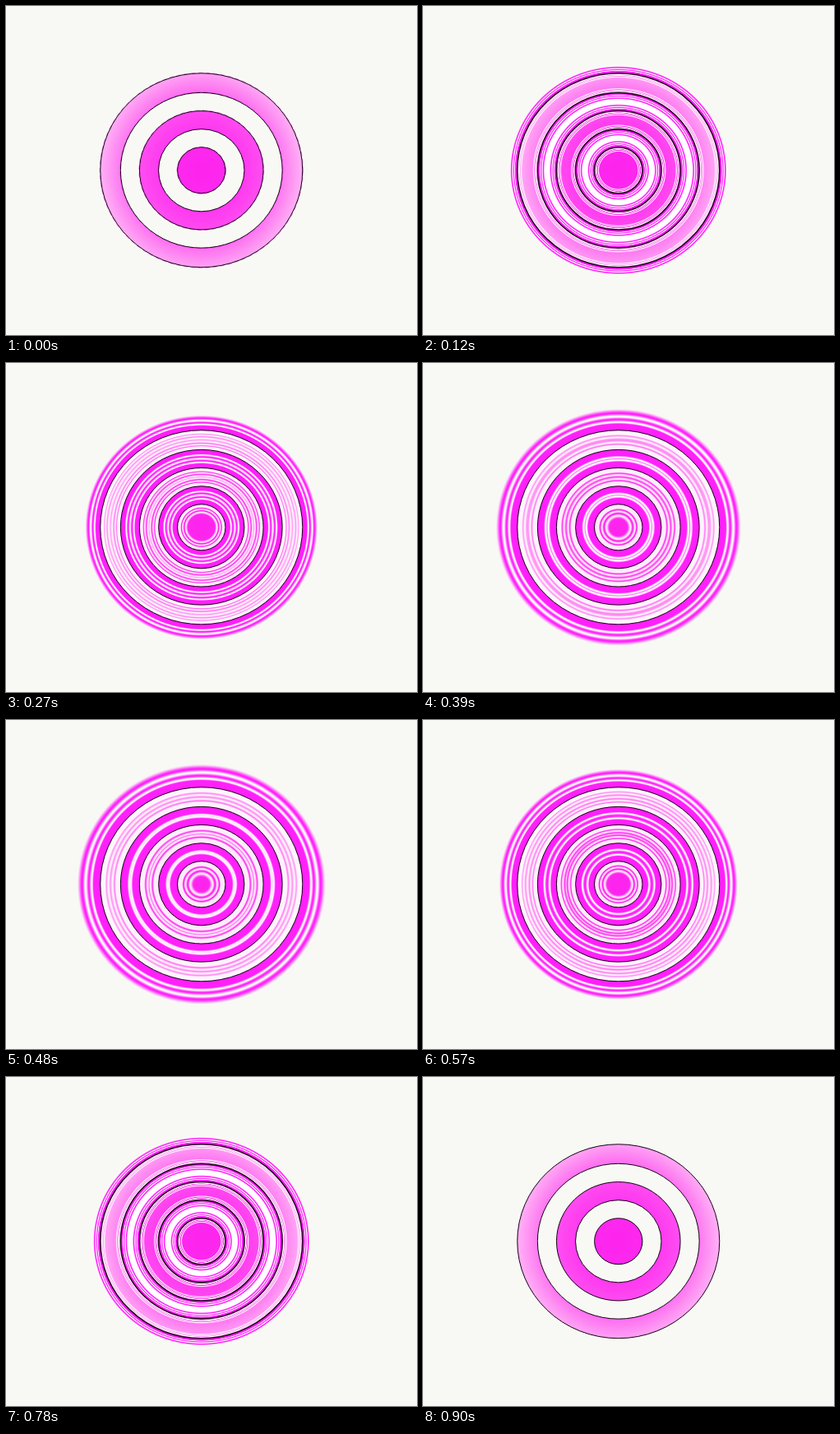
Animation of 500x400 px, one loop 1 s. Source, as an HTML page with a canvas:

```html
<!DOCTYPE html>
<html lang="en">
<head>
<meta charset="utf-8">
<title>Pulsing rings</title>
<style>
  html, body { margin: 0; width: 100%; height: 100%; overflow: hidden; background: #f8f9f4; }
  canvas { display: block; width: 500px; height: 400px; }
</style>
</head>
<body>
<canvas id="stage" width="500" height="400"></canvas>
<script>
const W = 500, H = 400, CX = 237.75, CY = 199.75;
const STEP = 30, LOOP = 1000, PEAK = 15;
const EDGES = [29.2, 52.2, 75.3, 98.4, 123];
const FLAT = 0.9593;
const BG = [248, 249, 244], WHITE = [255, 255, 255], GLOW = [255, 32, 250];

// Glow strength against distance / size
const CONTOUR = [[0, 1], [.27, 1], [.36, 0], [.48, 1], [.62, 0], [.76, 1], [.98, 0]];
// Fill colour against distance from the centre
const FILL = [
  [0, [253, 36, 238]], [30, [253, 40, 238]], [75, [255, 76, 241]],
  [98, [254, 116, 241]], [124, [255, 174, 245]]
];

const clamp = v => Math.max(0, Math.min(1, v));
const lerp = (a, b, t) => a + (b - a) * t;
const mix = (a, b, t) => a.map((v, i) => lerp(v, b[i], t));

function segment(points, x) {
  let i = 1;
  while (i < points.length - 1 && x > points[i][0]) i++;
  const [x0, a] = points[i - 1], [x1, b] = points[i];
  return [a, b, clamp((x - x0) / (x1 - x0))];
}

function contour(u) {
  const [a, b, t] = segment(CONTOUR, u);
  return lerp(a, b, t * t * (3 - 2 * t));
}

// Semi-axis of the ellipse through a point; outside the rings it grows evenly.
function ringRadius(x, y) {
  const r = Math.hypot(x, y / FLAT), rim = EDGES[4];
  return r <= rim ? r : rim + Math.hypot(x, y) * (1 - rim / r);
}

function colourAt(x, y, size) {
  const r = ringRadius(x, y);
  const d = Math.min(...EDGES.map(e => Math.abs(r - e)));
  const filled = EDGES.filter(e => r < e).length % 2 === 1;
  if (filled) {
    const base = mix(...segment(FILL, Math.hypot(x * 1.02, y)));
    return size > 1 ? mix(base, WHITE, .9 * contour(d / (size * .7))) : base;
  }
  if (size <= 1) return BG;
  const under = r < EDGES[4]
    ? clamp(size / 9)
    : clamp((.95 - d / size) / .2);
  return mix(mix(BG, WHITE, under), GLOW, contour(d / size));
}

function outline(g, grow = 0) {
  for (const e of EDGES) {
    g.beginPath();
    g.ellipse(CX, CY, e + grow, e * FLAT + grow, 0, 0, 2 * Math.PI);
    g.stroke();
  }
}

function paint(size) {
  const c = document.createElement("canvas");
  c.width = W;
  c.height = H;
  const g = c.getContext("2d");
  const img = g.createImageData(W, H);
  for (let y = 0, p = 0; y < H; y++) {
    for (let x = 0; x < W; x++, p += 4) {
      const dx = x + .5 - CX, dy = y + .5 - CY;
      const far = dx * dx + dy * dy > 160 * 160;
      const rgb = far ? BG : colourAt(dx, dy, size);
      for (let i = 0; i < 3; i++) img.data[p + i] = rgb[i];
      img.data[p + 3] = 255;
    }
  }
  g.putImageData(img, 0, 0);

  if (size === 1) {
    g.strokeStyle = "rgba(255,32,250,.55)";
    g.setLineDash([5, 4]);
    outline(g, .6);
    g.setLineDash([]);
  }
  const small = size > 1 ? clamp((17 - size) / 8) : 0;
  g.strokeStyle = small ? "#25001f" : "#160014";
  g.lineWidth = 1 + .6 * small;
  outline(g);
  return c;
}

const stage = document.getElementById("stage").getContext("2d");
const cache = new Map();
let shown = -1;

function draw(t) {
  const i = Math.floor((t % LOOP) / STEP);
  const k = i <= PEAK ? i : 2 * PEAK - i;
  const size = i >= 2 * PEAK ? 0 : 2 * k + 1;
  if (size === shown) return;
  if (!cache.has(size)) cache.set(size, paint(size));
  stage.drawImage(cache.get(size), 0, 0);
  shown = size;
}

for (let k = 0; k <= PEAK; k++) cache.set(2 * k + 1, paint(2 * k + 1));
cache.set(0, paint(0));

const start = performance.now();
function tick() {
  draw(performance.now() - start);
  requestAnimationFrame(tick);
}
tick();
</script>
</body>
</html>
```
